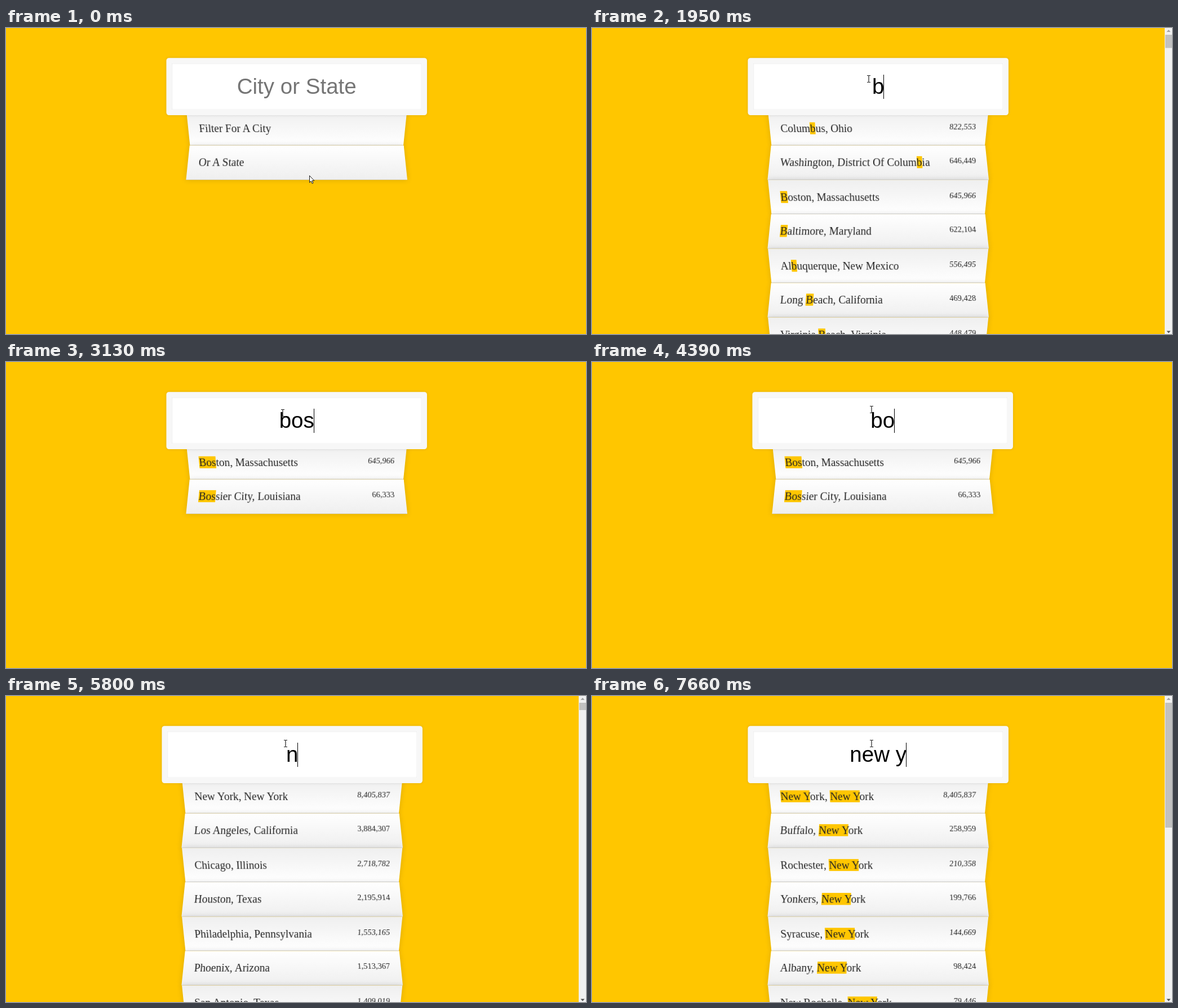
An HTML page for the animation above (8000 ms loop, 1029x544 px).

```html
<!DOCTYPE html>
<html lang="en">
<head>
<meta charset="utf-8">
<title>City search</title>
<style>
* { box-sizing: border-box; }
html, body { margin: 0; width: 100%; height: 100%; overflow: hidden; background: #ffc600; }
#stage { position: relative; width: 1029px; height: 544px; overflow: hidden; }
#app {
  position: absolute; top: -5px; width: 400px;
  transform: scale(.9635, .97); transform-origin: 0 0;
  font: 20px/22px "Liberation Serif", "Times New Roman", serif;
}
#field {
  position: absolute; left: -40px; top: 60px; width: 480px; height: 105px; z-index: 2;
  padding: 20px; border: 10px solid #f7f7f7; border-radius: 5px; background: #fff;
  box-shadow: 0 0 5px rgba(0,0,0,.12), inset 0 0 2px rgba(0,0,0,.19);
  font: 40px/45px "Liberation Sans", Arial, sans-serif;
  text-align: center; white-space: pre;
}
#field.empty { color: #757575; }
ul { position: absolute; top: 155px; left: 0; width: 400px; margin: 0; padding: 0; color: #222; }
li {
  display: flex; justify-content: space-between; list-style: none;
  height: 63px; padding: 20px; border-bottom: 1px solid #d8d8d8;
  box-shadow: 0 0 10px rgba(0,0,0,.14); text-transform: capitalize;
}
li:nth-child(odd) {
  transform: perspective(100px) rotateX(-3deg) translateY(3px);
  background: linear-gradient(to top, #fff, #efefef);
}
li:nth-child(even) {
  transform: perspective(100px) rotateX(3deg) translateY(2px) scale(1.001);
  background: linear-gradient(to bottom, #fff, #efefef);
}
li i { font-style: normal; font-size: 15px; line-height: 17px; }
mark { background: #ffc600; color: inherit; }
svg { position: absolute; left: 0; top: 0; z-index: 3; }
</style>
</head>
<body>
<div id="stage">
  <div id="app"><div id="field"><span id="text"></span></div><ul id="list"></ul></div>
  <svg width="1029" height="544" viewBox="0 0 1029 544">
    <g id="bar">
      <rect x="1016" width="13" height="544" fill="#f1f1f1"/>
      <rect id="thumb" x="1017" y="12" width="12" fill="#c1c1c1"/>
      <path d="M1019.5 7h7l-3.5-4z" fill="#a3a3a3"/>
      <path d="M1019.5 538.5h7l-3.5 4z" fill="#505050"/>
    </g>
    <rect id="caret" y="83" width="1" height="43" fill="#000"/>
    <path id="arrow" d="M.5 .5V12.7L3.2 10.1 5.1 14.4 7 13.6 5.1 9.3H8.8Z" fill="#fff" stroke="#000" stroke-width=".9"/>
    <path id="beam" d="M-3 -6H-1L0 -5.4 1 -6H3M-3 6H-1L0 5.4 1 6H3M0 -5.4V5.4" fill="none" stroke="#222" stroke-width="1.2"/>
  </svg>
</div>
<script>
const $ = id => document.getElementById(id);
const LOOP = 8000, HALF_WIDTH = 200 * .9635;

const cities = `New York, New York|8405837
Los Angeles, California|3884307
Chicago, Illinois|2718782
Houston, Texas|2195914
Philadelphia, Pennsylvania|1553165
Phoenix, Arizona|1513367
San Antonio, Texas|1409019
Columbus, Ohio|822553
Memphis, Tennessee|653450
Washington, District of Columbia|646449
Boston, Massachusetts|645966
Nashville-Davidson, Tennessee|634464
Baltimore, Maryland|622104
Las Vegas, Nevada|603488
Albuquerque, New Mexico|556495
Long Beach, California|469428
Virginia Beach, Virginia|448479
Omaha, Nebraska|434353
Minneapolis, Minnesota|400070
New Orleans, Louisiana|378715
Greensboro, North Carolina|279639
Newark, New Jersey|278427
Buffalo, New York|258959
Jersey City, New Jersey|257342
Lubbock, Texas|239538
Boise City, Idaho|214237
Rochester, New York|210358
Yonkers, New York|199766
Syracuse, New York|144669
Murfreesboro, Tennessee|117044
Ann Arbor, Michigan|117025
Boulder, Colorado|103166
Albany, New York|98424
New Rochelle, New York|79446
Bossier City, Louisiana|66333`.split('\n').map(row => row.split('|'));

// Lower end of the scrollbar thumb for each query; others need no scrollbar
const thumbEnd = { '': 25, b: 35.5, bo: 162.5, ne: 41, new: 85, 'new ': 95, 'new y': 234 };

// [start time, typed text, query of the list, caret shown]
const steps = [
  [0, '', null, 0], [772, '', null, 1], [1250, '', null, 0], [1750, '', null, 1],
  [1950, 'b', 'b', 1], [2420, 'bo', 'b', 1], [2560, 'bo', 'bo', 1], [2970, 'bo', 'bo', 0],
  [3030, 'bos', 'bo', 1], [3130, 'bos', 'bos', 1], [3600, 'bos', 'bos', 0],
  [4060, 'bo', 'bos', 1], [4450, 'bo', 'bo', 1], [4600, 'b', 'bo', 1], [4680, 'b', 'b', 1],
  [4780, '', 'b', 0], [5230, '', '', 1], [5630, '', '', 0], [5800, 'n', '', 1],
  [6090, 'ne', 'ne', 1], [6330, 'new', 'new', 1], [6640, 'new ', 'new', 1],
  [6790, 'new ', 'new ', 1], [7200, 'new ', 'new ', 0],
  [7600, 'new y', 'new ', 1], [7660, 'new y', 'new y', 1]
];

function rows(query) {
  if (query === null) return '<li>Filter for a city</li><li>or a state</li>';
  const match = new RegExp(query, 'gi');
  return cities.filter(([name]) => name.toLowerCase().includes(query)).slice(0, 7)
    .map(([name, count]) => {
      const label = query ? name.replace(match, '<mark>$&</mark>') : name;
      return `<li><span>${label}</span><i>${Number(count).toLocaleString('en-US')}</i></li>`;
    }).join('');
}

let shownList, shownStep;

function showStep(step) {
  const [, text, query, caret] = step;
  const end = thumbEnd[query];
  const center = end ? 507.3 : 515.5;
  if (query !== shownList) {
    $('list').innerHTML = rows(query);
    shownList = query;
  }
  $('app').style.left = center - HALF_WIDTH + 'px';
  $('field').className = text ? '' : 'empty';
  $('text').textContent = text || 'City or State';
  $('bar').style.display = end ? '' : 'none';
  if (end) $('thumb').setAttribute('height', end - 12);
  const width = text ? $('text').getBoundingClientRect().width : 0;
  $('caret').setAttribute('x', Math.floor(center + width / 2 - .3));
  $('caret').style.display = caret ? '' : 'none';
}

const bezier = (u, a, b, c, d) => {
  const v = 1 - u;
  return v * v * v * a + 3 * v * v * u * b + 3 * v * u * u * c + u * u * u * d;
};

function pointer(t) {
  if (t >= 3680) return [496, 84.5];
  const u = Math.max(0, Math.min(11, Math.floor((t - 70) / 78) + 1)) / 11;
  return [bezier(u, 538, 440, 235, 491), bezier(u, 262, 60, -75, 90.5)];
}

function showPointer(t) {
  const [x, y] = pointer(t);
  const typing = y > 53 && y < 156;
  $('arrow').style.display = typing ? 'none' : '';
  $('beam').style.display = typing ? '' : 'none';
  $(typing ? 'beam' : 'arrow').setAttribute('transform', `translate(${x} ${y})`);
}

function draw(t) {
  const step = steps.findLast(s => s[0] <= t);
  if (step !== shownStep) {
    showStep(step);
    shownStep = step;
  }
  showPointer(t);
}

const start = performance.now();
function tick() {
  draw((performance.now() - start) % LOOP);
  requestAnimationFrame(tick);
}
tick();
</script>
</body>
</html>
```
